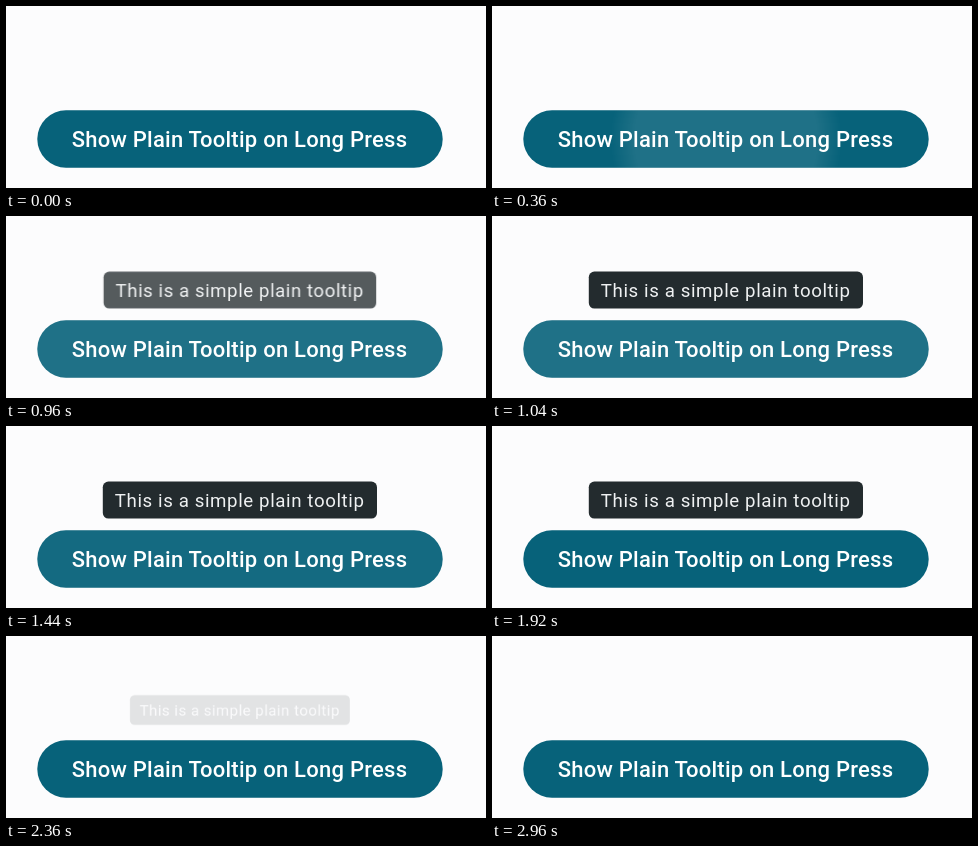
Animation, 480 px wide and 182 px high, one loop 3 s. Source, as an HTML page:

```html
<!DOCTYPE html>
<html lang="en">
<head>
<meta charset="utf-8">
<title>Plain tooltip</title>
<style>
  html, body { margin: 0; width: 100%; height: 100%; overflow: hidden; background: #fcfcfd; }
  svg { display: block; width: 480px; height: 182px; }
  text { font-family: Roboto, sans-serif; white-space: pre; }
  .label { font-size: 22px; font-weight: 500; letter-spacing: .245px; fill: #fff; }
  .tip-text { font-size: 18.7px; letter-spacing: .6px; fill: #eff1f2; }

  .ripple, .tip { animation: 3s linear infinite; }
  .ripple { transform-origin: 234px 133px; animation-name: spread, press; }
  .tip { transform-origin: 234px 74px; animation-name: scale, fade; }

  /* press at 290 ms, release at 1280 ms */
  @keyframes spread {
    0%, 9.667% { transform: scale(.1); animation-timing-function: cubic-bezier(.2, 0, .2, 1); }
    20.667%, 100% { transform: scale(1); }
  }
  @keyframes press {
    0%, 9.667% { opacity: 0; }
    11.167%, 42.667% { opacity: .1; }
    55.167%, 100% { opacity: 0; }
  }

  /* tooltip enters over 150 ms and leaves over 75 ms */
  @keyframes scale {
    0%, 28.167% { transform: scale(.8); animation-timing-function: cubic-bezier(0, 0, .2, 1); }
    33.167% { transform: scale(1); }
    76.5% { transform: scale(1); animation-timing-function: cubic-bezier(.4, 0, .2, 1); }
    79%, 100% { transform: scale(.8); }
  }
  @keyframes fade {
    0%, 28.167% { opacity: 0; }
    33.167%, 76.5% { opacity: 1; }
    79%, 100% { opacity: 0; }
  }
</style>
</head>
<body>
<svg viewBox="0 0 480 182">
  <defs>
    <clipPath id="pill"><rect x="31.3" y="104.3" width="405.4" height="57.4" rx="28.7"/></clipPath>
    <radialGradient id="soft">
      <stop offset=".78" stop-color="#fff"/>
      <stop offset="1" stop-color="#fff" stop-opacity="0"/>
    </radialGradient>
  </defs>

  <rect x="31.3" y="104.3" width="405.4" height="57.4" rx="28.7" fill="#07627a"/>
  <g clip-path="url(#pill)">
    <circle class="ripple" cx="234" cy="133" r="270" fill="url(#soft)"/>
  </g>
  <text class="label" x="65.7" y="140.8">Show Plain Tooltip on Long Press</text>

  <g class="tip">
    <rect x="96.8" y="55.6" width="274.2" height="37" rx="5.6" fill="#232b2e"/>
    <text class="tip-text" x="108.8" y="80.7">This is a simple plain tooltip</text>
  </g>
</svg>
</body>
</html>
```
